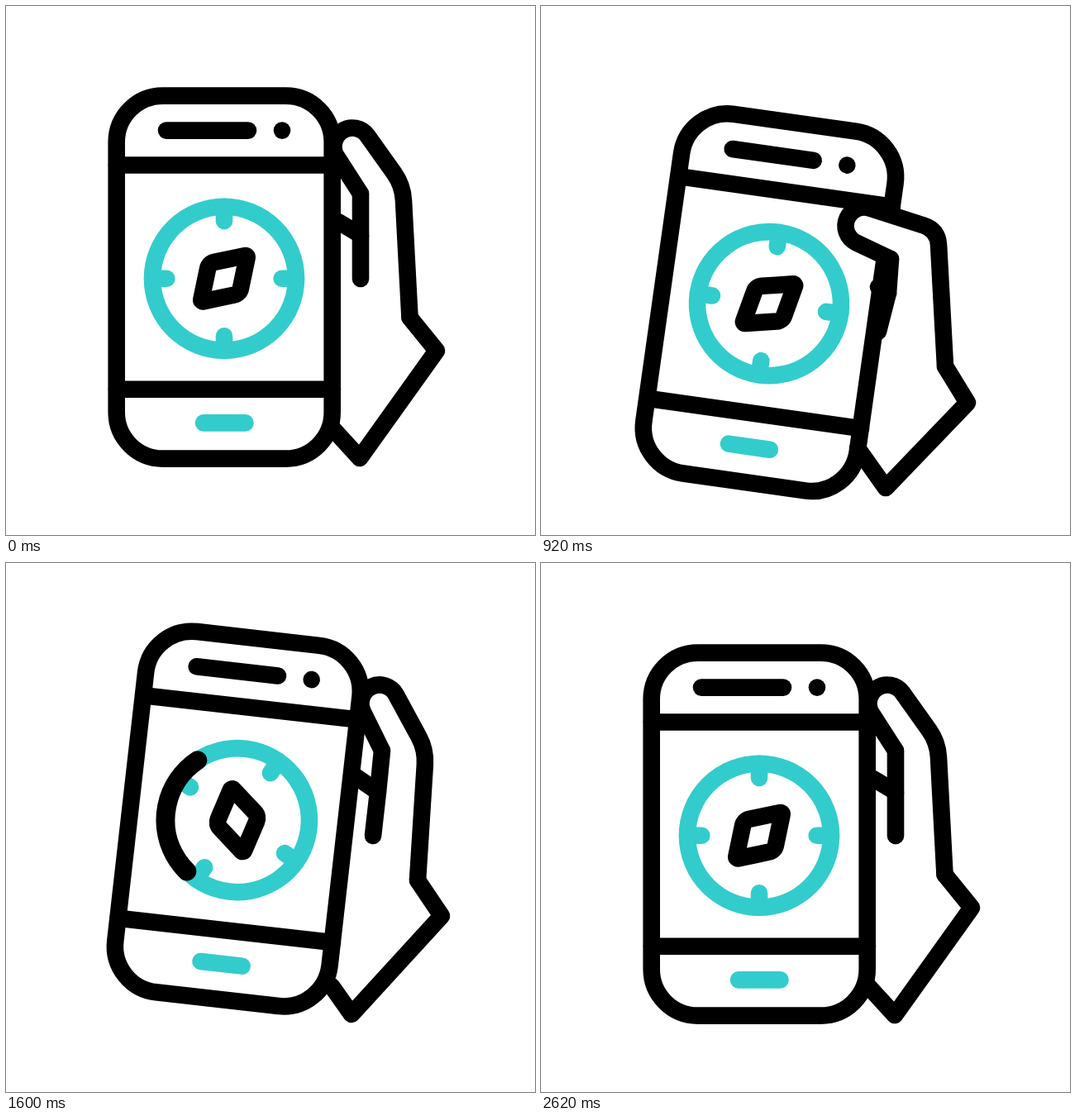
These frames come from a looping animation (640x640 px, 2.82 s). An HTML page with a canvas:

```html
<!DOCTYPE html>
<html lang="en">
<head>
<meta charset="utf-8">
<title>Phone compass</title>
<style>
html, body { margin: 0; width: 100%; height: 100%; overflow: hidden; background: #fff; }
canvas { display: block; width: 640px; height: 640px; }
</style>
</head>
<body>
<canvas id="stage" width="640" height="640"></canvas>
<script>
const ctx = document.getElementById('stage').getContext('2d');
const LOOP = 2820, INK = '#000', TEAL = '#33cccc', LINE = 20.6;
const CX = 264, CY = 329.7, RING = 87, TIP = 22.5;
const RAD = Math.PI / 180;

// Smooth track through keys, flat at both ends and never overshooting.
function track(times, vals) {
  const n = times.length;
  const d = i => (vals[i + 1] - vals[i]) / (times[i + 1] - times[i]);
  const slope = vals.map((_, i) => {
    if (i === 0 || i === n - 1) return 0;
    const a = d(i - 1), b = d(i);
    return a * b > 0 ? 2 * a * b / (a + b) : 0;
  });
  return t => {
    if (t <= times[0]) return vals[0];
    if (t >= times[n - 1]) return vals[n - 1];
    let i = 0;
    while (t > times[i + 1]) i++;
    const w = times[i + 1] - times[i], s = (t - times[i]) / w;
    const q = s * s * (3 - 2 * s);
    return vals[i] + (vals[i + 1] - vals[i]) * q
      + w * s * (1 - s) * (slope[i] * (1 - s) - slope[i + 1] * s);
  };
}

// Ease from 0 to 1 along a bezier with handles (x1, 0) and (x2, 1).
function ease(t, from, to, x1, x2) {
  const x = Math.min(1, Math.max(0, (t - from) / (to - from)));
  let lo = 0, hi = 1;
  for (let i = 0; i < 24; i++) {
    const s = (lo + hi) / 2, r = 1 - s;
    if (3 * r * r * s * x1 + 3 * r * s * s * x2 + s * s * s < x) lo = s; else hi = s;
  }
  return lo * lo * (3 - 2 * lo);
}

const POSES = [220, 600, 920, 1320, 1600, 1960, 2200];
const phoneX = track(POSES, [0, 4.5, 12, 21, 16, 3.5, 0]);
const phoneY = track([220, 600, 720, 920, 1320, 1600, 1680, 1840, 1960, 2200],
  [0, 34, 35, 30.5, -2.5, -18.5, -20.5, -10, -4.5, 0]);
const tilt = track([220, 1200, 2200], [0, 10, 0]);
const spin = track([1040, 1320, 1600, 1960, 2620], [0, -57, -61.5, -72, -180]);

// The hand returns to its first pose.
function joint(xs, ys) {
  const x = track(POSES, [...xs, xs[0]]), y = track(POSES, [...ys, ys[0]]);
  return t => [x(t), y(t)];
}
const hand = {
  end:     joint([429, 407, 408, 432, 444, 432], [330, 385, 394, 359, 330, 330]),
  mid:     joint([429, 413, 420, 443, 450, 433], [277, 337, 347, 296, 277, 277]),
  crook:   joint([429, 415, 423, 449, 455, 434], [227, 296, 306, 264, 227, 227]),
  thumb:   joint([419, 385, 391, 437, 452, 426], [170, 252, 266, 214, 170, 170]),
  knuckle: joint([480, 468, 480, 504, 508, 486], [217, 259, 271, 249, 226, 220]),
  palm:    joint([488.5, 488, 489, 497, 498, 491], [377, 422, 436, 410, 384, 378]),
  heel:    joint([521, 518, 516, 523, 527, 523], [417, 464, 480, 454, 427, 419]),
  wrist:   joint([428, 426, 417, 414, 418, 425], [547, 577, 583, 562, 546, 547]),
  cuff:    joint([396, 392, 383, 389, 394, 396], [512, 535, 535, 524, 512, 513]),
  finger:  joint([402, 398, 408, 427, 424, 405], [261, 330, 340, 284, 259, 261])
};

function stroke(color, width = LINE) {
  ctx.strokeStyle = color;
  ctx.lineWidth = width;
  ctx.stroke();
}

function line(color, ...pts) {
  ctx.beginPath();
  pts.forEach(p => ctx.lineTo(p[0], p[1]));
  stroke(color);
}

function drawCompass(t) {
  ctx.save();
  ctx.translate(CX, CY);
  ctx.rotate(spin(t) * RAD);

  ctx.beginPath();
  ctx.arc(0, 0, RING, 0, 7);
  stroke(TEAL);
  for (let i = 0; i < 4; i++) {
    line(TEAL, [0, -RING], [0, -69.7]);
    ctx.rotate(Math.PI / 2);
  }

  const head = ease(t, 1050, 1661, 1 / 3, 2 / 3);
  const tail = ease(t, 1113, 2026, 1 / 3, 0.45);
  if (head > 0.001 && tail < 0.999) {
    ctx.beginPath();
    ctx.arc(0, 0, RING, Math.PI * (1 - 2 * tail), Math.PI * (1 - 2 * head), true);
    stroke(INK, 23);
  }

  const a = 28.3, b = 18.5;
  ctx.beginPath();
  ctx.moveTo((a - b) / 2, -(a + b) / 2);
  ctx.arcTo(-b, -b, -a, a, 10);
  ctx.arcTo(-a, a, b, b, 2);
  ctx.arcTo(b, b, a, -a, 10);
  ctx.arcTo(a, -a, -b, -b, 2);
  ctx.closePath();
  stroke(INK);
  ctx.restore();
}

function drawPhone(t) {
  ctx.save();
  ctx.translate(CX + phoneX(t), CY + phoneY(t));
  ctx.rotate(tilt(t) * RAD);
  ctx.translate(-CX, -CY);

  ctx.beginPath();
  ctx.roundRect(133.7, 108.6, 261, 439, 56);
  stroke(INK);
  line(INK, [134, 192.5], [395, 192.5]);
  line(INK, [134, 463.7], [395, 463.7]);
  line(INK, [194, 150.6], [293, 150.6]);
  line(INK, [334, 150.6], [334.01, 150.6]);
  line(TEAL, [239, 504.4], [289.5, 504.4]);
  drawCompass(t);
  ctx.restore();
}

function drawRipple(t) {
  const p = (t - 1120) / 340;
  if (p <= 0 || p >= 1) return;
  ctx.save();
  ctx.beginPath();
  ctx.rect(354.5, 228, 60, 60);
  ctx.clip();
  ctx.globalAlpha = Math.min(1, (1 - p) / 0.44);
  ctx.beginPath();
  ctx.arc(384.5, 258, 36 * p, 0, 7);
  stroke(INK);
  ctx.restore();
}

// Angle at which a line from p touches the thumb tip circle.
function touch(c, p, side) {
  const dx = p[0] - c[0], dy = p[1] - c[1];
  return Math.atan2(dy, dx) + side * Math.acos(TIP / Math.hypot(dx, dy));
}

function toward(p, q, dist) {
  const k = dist / Math.hypot(q[0] - p[0], q[1] - p[1]);
  return [p[0] + (q[0] - p[0]) * k, p[1] + (q[1] - p[1]) * k];
}

function drawHand(t) {
  const h = {};
  for (const name in hand) h[name] = hand[name](t);
  const inner = touch(h.thumb, h.crook, 1), outer = touch(h.thumb, h.knuckle, -1);
  const top = [h.thumb[0] + TIP * Math.cos(outer), h.thumb[1] + TIP * Math.sin(outer)];
  const k1 = toward(h.knuckle, top, 18), k2 = toward(h.knuckle, h.palm, 18);

  ctx.beginPath();
  ctx.moveTo(...h.crook);
  ctx.arc(...h.thumb, TIP, inner, outer);
  ctx.lineTo(...k1);
  ctx.quadraticCurveTo(...h.knuckle, ...k2);
  ctx.lineTo(...h.palm);
  ctx.fillStyle = '#fff';
  ctx.fill();
  stroke(INK);
  line(INK, h.palm, h.heel, h.wrist, h.cuff);
  line(INK, h.crook, h.mid, h.end);
  line(INK, h.finger, h.mid);
}

function frame(now) {
  const t = now % LOOP;
  ctx.fillStyle = '#fff';
  ctx.fillRect(0, 0, 640, 640);
  ctx.lineCap = ctx.lineJoin = 'round';
  drawPhone(t);
  drawRipple(t);
  drawHand(t);
  requestAnimationFrame(frame);
}

const start = performance.now();
(function tick() {
  const loop = () => { frameAt(); requestAnimationFrame(loop); };
  const frameAt = () => {
    const t = (performance.now() - start) % LOOP;
    ctx.fillStyle = '#fff';
    ctx.fillRect(0, 0, 640, 640);
    ctx.lineCap = ctx.lineJoin = 'round';
    drawPhone(t);
    drawRipple(t);
    drawHand(t);
  };
  loop();
})();
</script>
</body>
</html>
```
